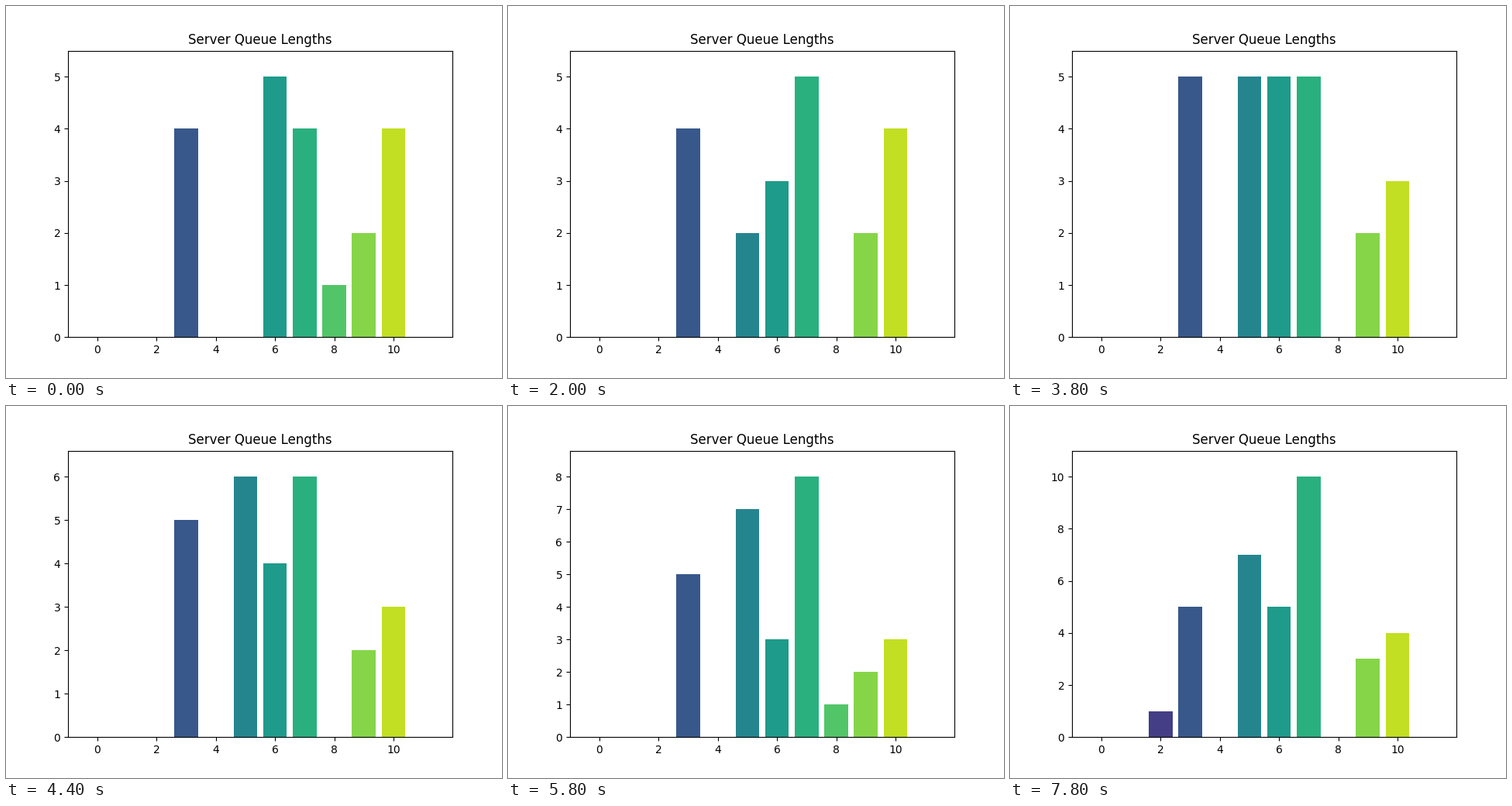
Animation of 640 by 480 pixels, one loop 8 s. Source, as a matplotlib script:

```python
import matplotlib.pyplot as plt
import numpy as np
from matplotlib.animation import FuncAnimation

START = [0, 0, 0, 4, 0, 0, 5, 4, 1, 2, 4, 0]

# One event per step: +n is an arrival at server n, -n a departure.
EVENTS = """
+5 -10 -8 +5 -6 +8 -6 +7 -8 +10
-7 +7 +5 +3 +6 +5 -10 +6 +5
+7 -6 +5 +7 +10 -10
+7 -6 +8 +5 -6 -8 +7 +6
+6 +7 +9 +2 +6 +10
"""


def queue_history():
    rows = [np.array(START)]
    for event in EVENTS.split():
        row = rows[-1].copy()
        row[int(event[1:])] += 1 if event[0] == "+" else -1
        rows.append(row)
    return np.array(rows)


history = queue_history()
peaks = np.maximum.accumulate(history.max(axis=1))

fig, ax = plt.subplots(figsize=(6.4, 4.8), dpi=100)
servers = np.arange(len(START))
colors = plt.cm.viridis(np.linspace(0, 1, len(START)))
bars = ax.bar(servers, history[0], color=colors)
ax.set_title("Server Queue Lengths")


def update(step):
    for bar, length in zip(bars, history[step]):
        bar.set_height(length)
    ax.set_ylim(0, 1.1 * peaks[step])
    return bars


anim = FuncAnimation(fig, update, frames=len(history), interval=200,
                     repeat=True, repeat_delay=0)
plt.show()
```
